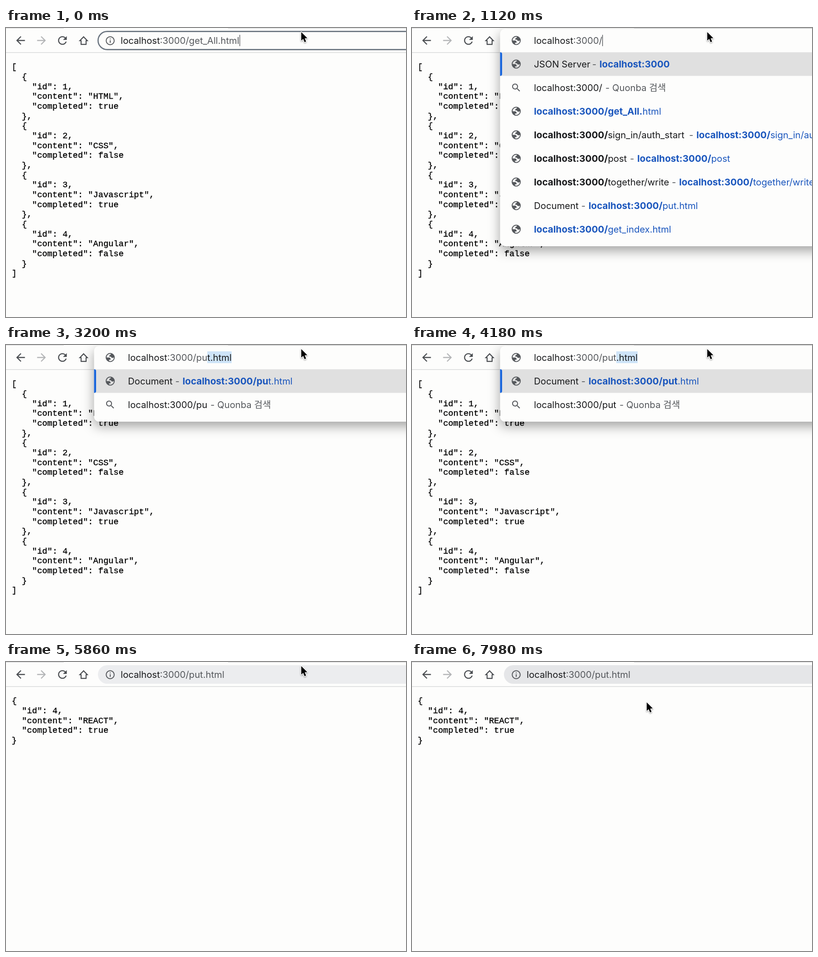
Recreate the animation shown at these times as an HTML page with a canvas. Size 879x637 px, loop 8 s.

```html
<!DOCTYPE html>
<html lang="en">
<head>
<meta charset="utf-8">
<title>Address bar</title>
<style>
html, body { margin: 0; width: 100%; height: 100%; overflow: hidden; background: #fdfdfc; }
canvas { display: block; width: 879px; height: 637px; }
</style>
</head>
<body>
<canvas></canvas>
<script>
const W = 879, H = 637, LOOP = 8000;
const canvas = document.querySelector('canvas');
const ctx = canvas.getContext('2d');
const dpr = window.devicePixelRatio || 1;
canvas.width = W * dpr;
canvas.height = H * dpr;

const SANS = 'Inter, "Noto Sans CJK KR", "Noto Sans CJK", sans-serif';
const REGULAR = `400 20.2px ${SANS}`, BOLD = `700 20.6px ${SANS}`;
const MONO = '18.67px "Liberation Mono", monospace';
const PAPER = '#fdfdfc', INK = '#18191b', GREY = '#55585c', BLUE = '#1a56bd';
const HOST = 'localhost:3000/';

// Icons on a 24-unit grid
const ICON = {
  arrow: 'M20 11H7.83l5.59-5.59L12 4l-8 8 8 8 1.41-1.41L7.83 13H20v-2z',
  reload: 'M17.65 6.35C16.2 4.9 14.21 4 12 4c-4.42 0-7.99 3.58-7.99 8s3.57 8 7.99 8c3.73 0 6.84-2.55 7.73-6h-2.08c-.82 2.33-3.04 4-5.65 4-3.31 0-6-2.69-6-6s2.69-6 6-6c1.66 0 3.14.69 4.22 1.78L13 11h7V4l-2.35 2.35z',
  info: 'M11 7h2v2h-2zm0 4h2v6h-2zm1-9C6.48 2 2 6.48 2 12s4.48 10 10 10 10-4.48 10-10S17.52 2 12 2zm0 18c-4.41 0-8-3.59-8-8s3.59-8 8-8 8 3.59 8 8-3.59 8-8 8z',
  search: 'M15.5 14h-.79l-.28-.27C15.41 12.59 16 11.11 16 9.5 16 5.91 13.09 3 9.5 3S3 5.91 3 9.5 5.91 16 9.5 16c1.61 0 3.09-.59 4.23-1.57l.27.28v.79l5 4.99L20.49 19l-4.99-5zm-6 0C7.01 14 5 11.99 5 9.5S7.01 5 9.5 5 14 7.01 14 9.5 11.99 14 9.5 14z',
  globe: 'M22 12A10 10 0 1 0 2 12A10 10 0 1 0 22 12ZM4 12h4.4c3.4 0 4.9 1.7 4.5 5.1H9.5v2.5A8 8 0 0 0 20 11.5C19.3 12.5 18.3 13 17 13c-2.1 0-3.2-.9-3.2-2.75H10c-.3-2.7.7-4.1 2.9-4.1 0-1 .3-1.6.8-1.95A8 8 0 0 0 4 12z'
};
for (const name in ICON) ICON[name] = new Path2D(ICON[name]);
const HOME = new Path2D('M162.3 28H165V36.2H176V28H178.7L170.5 19.4Z');
const POINTER = new Path2D('M0 0V18.7L4.3 14.9 7.3 22.2 10.6 20.8 7.6 13.7 13.3 13.3Z');

// Page contents
const record = (id, content, completed) =>
  ['{', `  "id": ${id},`, `  "content": "${content}",`, `  "completed": ${completed}`, '}'];
const items = [
  record(1, 'HTML', true), record(2, 'CSS', false),
  record(3, 'Javascript', true), record(4, 'Angular', false)
];
const LIST = ['['];
items.forEach((item, i) => {
  for (const line of item) LIST.push('  ' + line);
  if (i < items.length - 1) LIST[LIST.length - 1] += ',';
});
LIST.push(']');
const SINGLE = record(4, 'REACT', true);

// Suggestions: asterisks switch bold on and off
const search = query => ({ query });
const link = (url, title, x = 268) => ({ url, title, x });
const page = (typed, rest, x) => link(`*${HOST}${typed}*${rest}`, `*${HOST}${typed}*${rest}`, x);
const doc = (typed, rest) => link(`*${HOST}${typed}*${rest}`, 'Document', 388);

const ROOT_ROWS = [
  link('*localhost:3000*', 'JSON Server', 412),
  search(HOST),
  link(`*${HOST}get_All.*html`),
  page('', 'sign_in/auth_start', 625),
  page('', 'post', 495),
  page('', 'together/write', 587),
  doc('', 'put.html'),
  link(`*${HOST}*get_index.html`)
];
const P_ROWS = [
  page('p', 'ost', 497), search(HOST + 'p'),
  doc('p', 'ost.html'), doc('p', 'ut.html'),
  page('p', 'ost/1', 511), page('p', 'ost/3', 515)
];
const putRows = (typed, rest) => [doc(typed, rest), search(HOST + typed)];
const erasedRows = url => [
  link(`*${url}*`), search(url),
  link(`*${url}*${(HOST + 'get_All.html').slice(url.length)}`)
];

// Timeline
const ERASE_AT = 460, ERASE_STEP = 50;
const P_AT = 1960, U_AT = 2860, T_AT = 3620, ENTER_AT = 5440, LOAD_AT = 5600;

function stateAt(t) {
  if (t < ERASE_AT) return { url: HOST + 'get_All.html', focus: true, body: LIST };
  if (t < P_AT) {
    const left = Math.max(0, 11 - Math.floor((t - ERASE_AT) / ERASE_STEP));
    const url = HOST + 'get_All.html'.slice(0, left);
    return { url, hint: '', rows: left ? erasedRows(url) : ROOT_ROWS, body: LIST };
  }
  if (t < U_AT) return { url: HOST + 'p', hint: 'ost', rows: P_ROWS, body: LIST };
  if (t < T_AT) return { url: HOST + 'pu', hint: 't.html', rows: putRows('pu', 't.html'), body: LIST };
  if (t < ENTER_AT) return { url: HOST + 'put', hint: '.html', rows: putRows('put', '.html'), body: LIST };
  return { url: HOST + 'put.html', body: t < LOAD_AT ? LIST : SINGLE };
}

const progress = (t, from, to) => Math.min(1, Math.max(0, (t - from) / (to - from)));
const smooth = p => p * p * (3 - 2 * p);

function icon(name, cx, cy, scale, color, flip = 1) {
  ctx.save();
  ctx.translate(cx, cy);
  ctx.scale(scale * flip, scale);
  ctx.translate(-12, -12);
  ctx.fillStyle = color;
  ctx.fill(ICON[name], 'evenodd');
  ctx.restore();
}

function text(str, x, y, color) {
  ctx.fillStyle = color;
  str.split('*').forEach((part, i) => {
    ctx.font = i % 2 ? BOLD : REGULAR;
    ctx.fillText(part, x, y);
    x += ctx.measureText(part).width;
  });
  return x;
}

function box(x, y, w, h, radii, color) {
  ctx.beginPath();
  ctx.roundRect(x, y, w, h, radii);
  ctx.fillStyle = color;
  ctx.fill();
}

function address(url, x) {
  return text(url.slice(9), text(url.slice(0, 9), x, 35, INK), 35, GREY);
}

function caret(x) {
  ctx.fillStyle = GREY;
  ctx.fillRect(Math.round(x), 15, 1.4, 25);
}

function drawPage(lines) {
  ctx.font = MONO;
  ctx.fillStyle = ctx.strokeStyle = '#000';
  ctx.lineWidth = 0.35;
  lines.forEach((line, i) => {
    const y = 91.2 + 21.67 * i;
    ctx.fillText(line, 12.4, y);
    ctx.strokeText(line, 12.4, y);
  });
}

function drawToolbar() {
  ctx.fillStyle = '#d4d5d6';
  ctx.fillRect(0, 0, 127, 1);
  ctx.fillRect(488, 0, W - 488, 1);
  ctx.fillRect(0, 53.5, W, 1.3);
  icon('arrow', 32, 27.5, 1.2, '#4b4e52');
  icon('arrow', 78, 27.5, 1.2, '#b4b5b7', -1);
  icon('reload', 124, 27.5, 1.2, '#4b4e52');
  ctx.strokeStyle = '#4b4e52';
  ctx.lineWidth = 2.2;
  ctx.stroke(HOME);
}

function drawBar(state, t) {
  if (state.focus) {
    ctx.beginPath();
    ctx.roundRect(202.3, 7.6, 760, 40, 20);
    ctx.strokeStyle = '#6b7580';
    ctx.lineWidth = 2.6;
    ctx.stroke();
  } else {
    const p = progress(t, 5700, 6100);
    const shade = [241, 242, 244].map(v => Math.round(v - 12 * p));
    box(202, 7, 760, 41, 20.5, `rgb(${shade})`);
  }
  icon('info', 229, 28, 0.97, GREY);
  const end = address(state.url, 252);
  if (state.focus) caret(end);
}

function drawRow(row, i) {
  const cy = 79.5 + 52 * i, base = cy + 7.5;
  icon(row.query ? 'search' : 'globe', 229, cy, 1, GREY);
  if (row.query) {
    const end = text(row.query, 268, base, INK);
    text('-', end + 7, base, GREY);
    text('Quonba 검색', end + 22, base, GREY);
    return;
  }
  if (row.title) {
    text(row.title, 268, base, INK);
    text('-', row.x - 16, base, GREY);
  }
  text(row.url, row.x, base, BLUE);
}

function drawPopup({ url, hint, rows }) {
  ctx.save();
  ctx.shadowColor = 'rgba(0,0,0,.36)';
  ctx.shadowBlur = 26 * dpr;
  ctx.shadowOffsetY = 10 * dpr;
  box(193.5, 2, 760, 63 + 52 * rows.length, 11, PAPER);
  ctx.restore();

  ctx.fillStyle = '#e0e0e0';
  ctx.fillRect(193.5, 53.5, W, 52);
  box(193.5, 53.5, 4.5, 52, [0, 4, 4, 0], '#1a66dc');

  icon('globe', 229, 27.5, 1, GREY);
  const end = address(url, 268);
  if (hint) {
    ctx.font = REGULAR;
    ctx.fillStyle = '#cee4f8';
    ctx.fillRect(end, 14, ctx.measureText(hint).width, 26);
    text(hint, end, 35, INK);
  } else {
    caret(end);
  }
  rows.forEach(drawRow);
}

function drawPointer(t) {
  const p = smooth(progress(t, 7300, 7980));
  ctx.save();
  ctx.translate(648.8 - 133 * p, 9 + 80 * p);
  ctx.shadowColor = 'rgba(0,0,0,.35)';
  ctx.shadowBlur = 3 * dpr;
  ctx.shadowOffsetY = 1.5 * dpr;
  ctx.lineJoin = 'round';
  ctx.lineWidth = 2.6;
  ctx.strokeStyle = '#fff';
  ctx.stroke(POINTER);
  ctx.shadowColor = 'transparent';
  ctx.fillStyle = '#000';
  ctx.fill(POINTER);
  ctx.restore();
}

function draw(t) {
  const state = stateAt(t);
  ctx.setTransform(dpr, 0, 0, dpr, 0, 0);
  ctx.fillStyle = PAPER;
  ctx.fillRect(0, 0, W, H);
  drawPage(state.body);
  drawToolbar();
  if (state.rows) drawPopup(state);
  else drawBar(state, t);
  drawPointer(t);
}

const start = performance.now();
function tick() {
  draw((performance.now() - start) % LOOP);
  requestAnimationFrame(tick);
}
tick();
</script>
</body>
</html>
```
